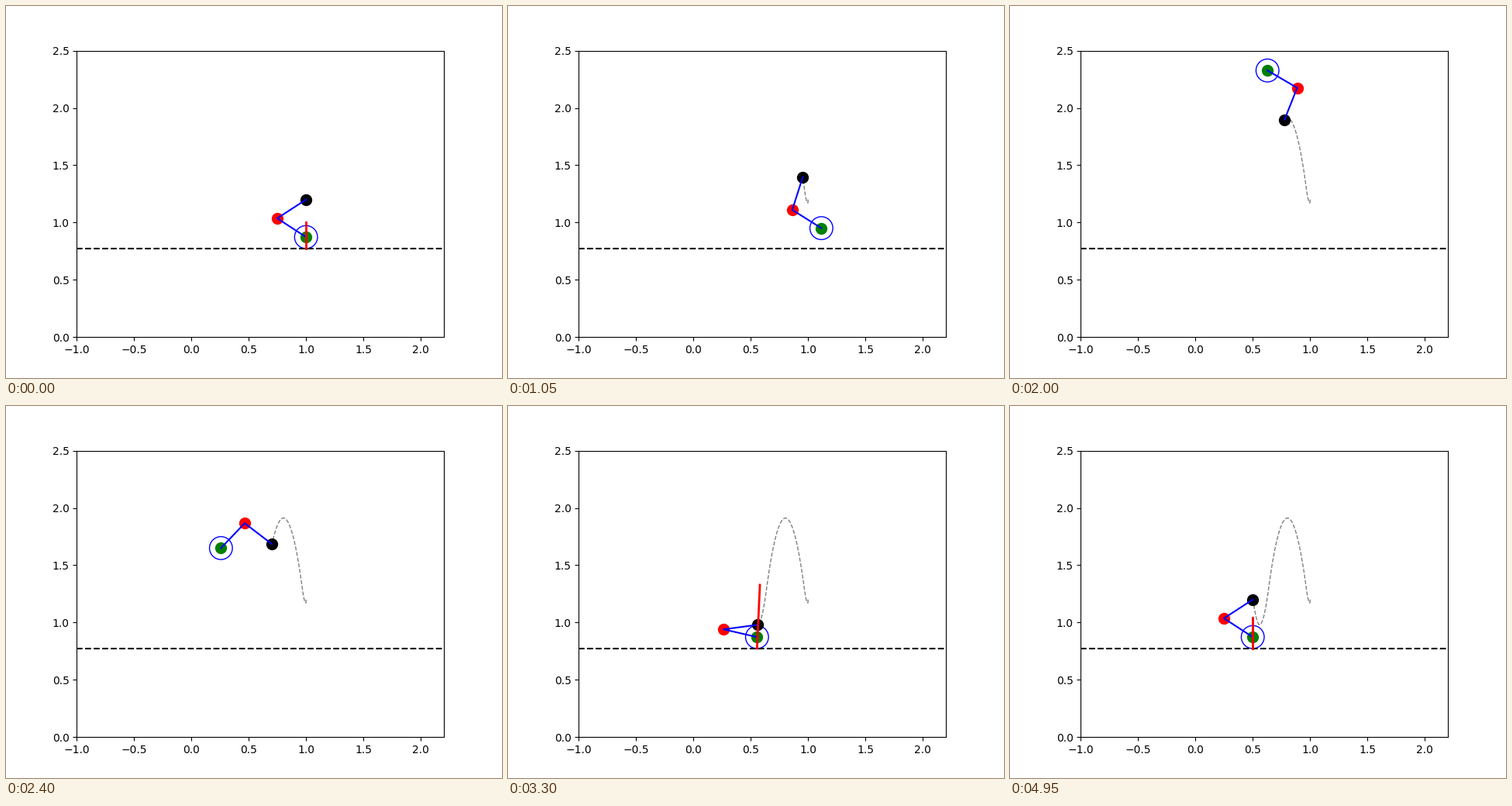
A matplotlib script that plays this animation: 640x480 px, repeating every 5000 ms.

```python
import numpy as np
import matplotlib.pyplot as plt
from matplotlib.animation import FuncAnimation

FRAMES = 100
TAKEOFF, TOUCHDOWN, LOWEST = 20, 55, 66
LINK = 0.3
RADIUS = 0.1
GROUND = 0.773
APEX = 37.22


def smooth(u):
    u = np.clip(u, 0, 1)
    return u * u * (3 - 2 * u)


def flight_hip(n):
    t = n - APEX
    return np.array([0.803 - 0.0093 * t, 1.912 - 0.001962 * t * t])


def hip_at(n):
    if n < TAKEOFF:
        x = 1 - 0.037 * (n / TAKEOFF) ** 4.8
        y = 1.2 - 0.0285 * smooth(n / 10)
        if n > 11:
            y += 0.159 * ((n - 11) / 9) ** 3.83
        return np.array([x, y])
    if n <= TOUCHDOWN:
        return flight_hip(n)
    if n <= LOWEST:
        left = (LOWEST - n) / (LOWEST - TOUCHDOWN)
        x0, y0 = flight_hip(TOUCHDOWN)
        return np.array([0.56 + (x0 - 0.56) * left ** 1.3,
                         0.98 + (y0 - 0.98) * left ** 2.46])
    u = (n - LOWEST) / (FRAMES - 1 - LOWEST)
    return np.array([0.5 + 0.06 * (1 - u) ** 1.55, 0.98 + 0.22 * smooth(u)])


def flight_angles(n):
    t = n - 32
    return np.radians([354.2 + 9.27 * t, 433.2 + 9.57 * t])


def unit(angle):
    return np.array([np.cos(angle), np.sin(angle)])


def stance_foot(n):
    if n <= TAKEOFF:
        x = 1 + 0.051 * smooth(n / 11)
    elif n <= LOWEST:
        left = (LOWEST - n) / (LOWEST - TOUCHDOWN)
        x = 0.555 - 0.066 * left ** 3
    else:
        u = (n - LOWEST) / (FRAMES - 1 - LOWEST)
        x = 0.5 + 0.055 * (1 - u) ** 2.6
    return np.array([x, GROUND + RADIUS])


def pose(n):
    """Positions of hip, knee and foot."""
    hip = hip_at(n)
    if TAKEOFF < n <= TOUCHDOWN:
        thigh, shin = flight_angles(n)
        knee = hip + LINK * unit(thigh)
        return hip, knee, knee + LINK * unit(shin)
    foot = stance_foot(n)
    dx, dy = foot - hip
    bend = np.arccos(min(1, np.hypot(dx, dy) / (2 * LINK)))
    knee = hip + LINK * unit(np.arctan2(dy, dx) - bend)
    return hip, knee, foot


def force_at(n):
    """Length and slope of the ground reaction, or None in the air."""
    if n <= 11:
        return 0.228 + 0.432 * n / 11, -0.04 * n / 11
    if n < TAKEOFF:
        return 0.66 + 0.71 * np.sin(np.pi / 2 * (n - 11) / 8), -0.045
    if n < TOUCHDOWN:
        return None
    if n == TOUCHDOWN:
        return 2.5, 0.03
    if n <= LOWEST:
        left = (LOWEST - n) / (LOWEST - TOUCHDOWN)
        return 0.555 + 0.8 * left, 0.045
    u = (n - LOWEST) / (FRAMES - 1 - LOWEST)
    return 0.268 + 0.287 * (1 - u) ** 1.5, 0.045 * (1 - u) ** 2


path = np.array([hip_at(n) for n in range(FRAMES)])

fig, ax = plt.subplots(figsize=(6.4, 4.8), dpi=100)
ax.set_xlim(-1, 2.2)
ax.set_ylim(0, 2.5)
ax.set_aspect("equal")
ax.plot([-1, 2.2], [GROUND, GROUND], "k--", lw=1.5)

trace, = ax.plot([], [], "--", color="gray", lw=1)
dots = [ax.plot([], [], "o", color=c, ms=10)[0] for c in ("black", "red", "green")]
leg, = ax.plot([], [], "-", color="blue", lw=1.5)
wheel = plt.Circle((0, 0), RADIUS, fill=False, ec="blue", lw=1)
ax.add_patch(wheel)
force, = ax.plot([], [], "-", color="red", lw=2)


def draw(n):
    joints = pose(n)
    for dot, (x, y) in zip(dots, joints):
        dot.set_data([x], [y])
    leg.set_data(*np.array(joints).T)
    trace.set_data(*path[:n + 1].T)
    foot = joints[2]
    wheel.center = tuple(foot)
    push = force_at(n)
    if push is None:
        force.set_data([], [])
    else:
        size, slope = push
        x, y = foot[0], foot[1] - RADIUS
        force.set_data([x, x + slope * size], [y, y + size])
    return [trace, *dots, leg, wheel, force]


anim = FuncAnimation(fig, draw, frames=FRAMES, interval=50,
                     init_func=lambda: draw(0), repeat=True, repeat_delay=0)
plt.show()
```
